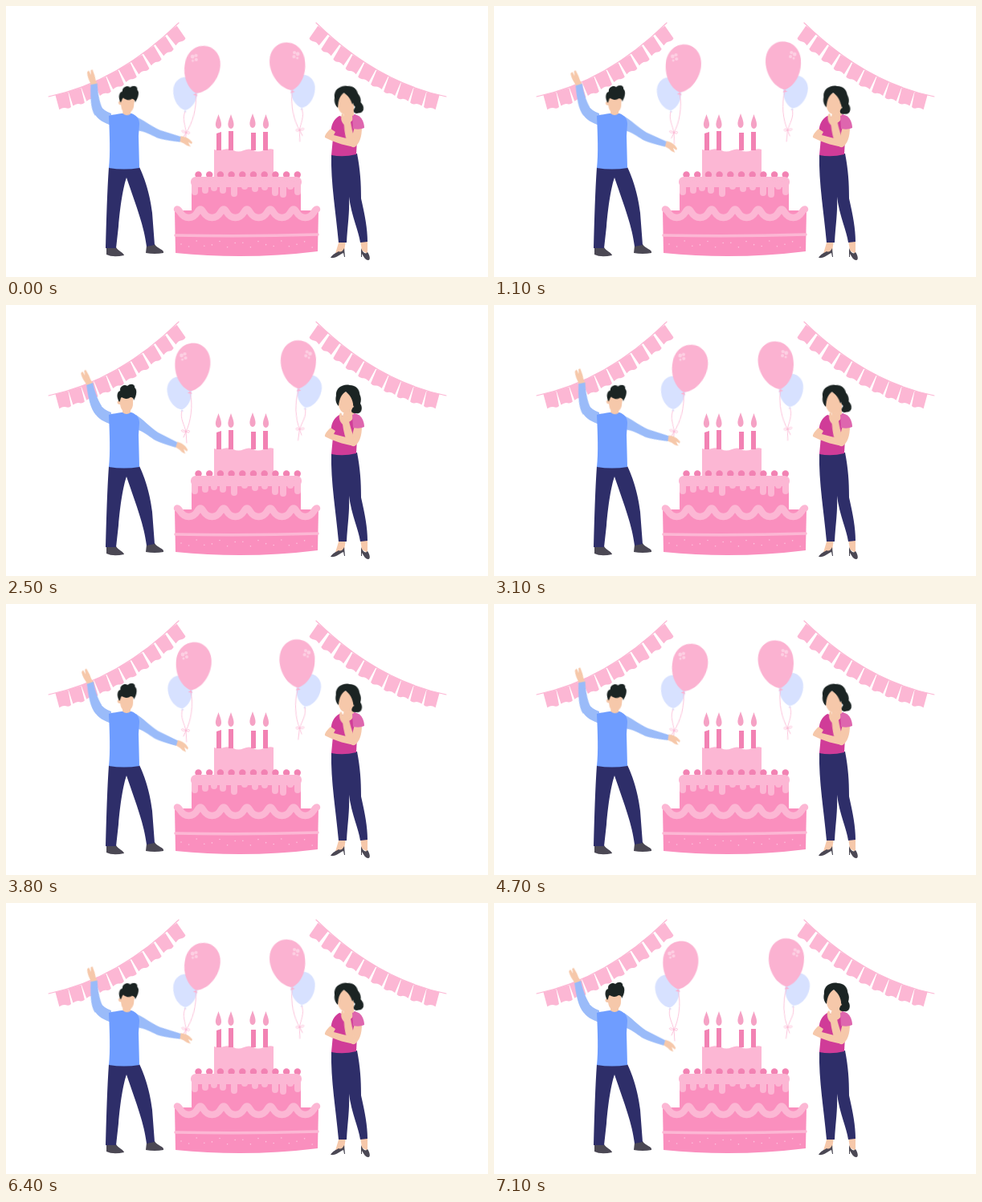
These frames come from a looping animation (600x338 px, 7200 ms). An HTML page:

```html
<!DOCTYPE html>
<html lang="en">
<head>
<meta charset="utf-8">
<title>Birthday cake</title>
<style>
  html, body { margin: 0; width: 100%; height: 100%; overflow: hidden; background: #fff; }
  svg { display: block; width: 100vw; height: 100vh; }

  .light { fill: #fcb7d4; }
  .mid { fill: #fa8fbe; }
  .deep { fill: #f282b3; }
  .skin { fill: #f6c8aa; }
  .navy { fill: #2e2e69; }
  .shoe { fill: #4b4854; }
  .hair { fill: #1b2423; }
  .sleeve { fill: #9abbf9; }
  .shirt { fill: #6f9dff; }
  .top { fill: #d03c98; }
  .cuff { fill: #de66ae; }
  .line { fill: none; stroke: #fcb7d4; stroke-linecap: round; stroke-linejoin: round; }

  /* Each part swings between two angles; the loop cuts back hard after nine half swings. */
  .swing {
    transform-origin: var(--at);
    animation: swing 7200ms cubic-bezier(.37, 0, .63, 1) infinite;
  }
  @keyframes swing {
    0%, 22.222%, 44.444%, 66.667%, 88.889% { transform: rotate(var(--from)); }
    11.111%, 33.333%, 55.556%, 77.778%, 100% { transform: rotate(var(--to)); }
  }
</style>
</head>
<body>
<svg viewBox="0 0 600 338" preserveAspectRatio="none">
  <defs>
    <path id="balloon" d="M0 30C-12 27-22 12-22-5C-22-20-12-30 0-30S22-20 22-5C22 12 12 27 0 30L3 33H-3Z"/>
    <path id="flame" d="M0-18C2-12 4-8 3.500-4C3-1 1 0 0 0S-3-1-3.500-4C-4-8-2-12 0-18Z"/>
    <g id="garland">
      <path class="line" d="M53 113Q140 95 215 21" stroke-width="1.2"/>
      <g id="flags" class="light"></g>
    </g>
    <g id="bunch">
      <use href="#balloon" transform="translate(216 110)rotate(-8)scale(.69)" fill="#d7e1ff"/>
      <path class="line" stroke-width=".8" d="M219 132C216 141 222 149 224 158M229 110C233 125 230 146 224 158"/>
      <path class="line" stroke-width=".8" d="M224 158C217 152 216 160 224 158C230 153 230 162 224 158L221 165M224 158L225 172"/>
      <use href="#balloon" transform="translate(231.500 77.500)rotate(5)" fill="#fbb2d1"/>
      <g fill="#fdd0e3">
        <circle cx="218" cy="63" r="2.400"/><circle cx="222" cy="61" r="2"/>
        <circle cx="223" cy="66" r="2"/><circle cx="219" cy="68" r="1.500"/>
      </g>
    </g>
  </defs>

  <use href="#garland"/>
  <use href="#garland" transform="translate(601)scale(-1 1)"/>

  <g class="swing" style="--at:224px 159px;--from:8.5deg;--to:0deg"><use href="#bunch"/></g>
  <g class="swing" style="--at:365px 155px;--from:-5deg;--to:4.6deg">
    <use href="#bunch" transform="translate(589.500 -3)scale(-1 1)"/>
  </g>

  <g id="cake">
    <path class="mid" d="M210 255H389L388 306Q300 317 211 308Z"/>
    <path class="line" d="M211 286Q300 288 388 285" stroke-width="3.500"/>
    <g id="specks" fill="#fdc3de"></g>
    <path class="mid" d="M231 216H367V256H231Z"/>
    <path id="scallops" class="line" stroke-width="8.500"/>
    <path class="light" d="M259 179Q265 181 271 179T283 180T296 180T308 180T321 180T333 179V215H259Z"/>
    <g id="berries" class="deep"></g>
    <rect class="light" x="230" y="213" width="138" height="13" rx="6"/>
    <path class="line" stroke-width="8" d="M235 221v11M248 221v9M259 221v6M270 221v9M284 221v13M297 221v4M310 221v7M322 221v5M335 221v12M345 221v14M354 221v4M363 221v11"/>
    <path class="deep" d="M262 159l6-2v23h-6zM277 156h6v24h-6zM305 158h6v22h-6zM320 157h6v23h-6z"/>
    <g fill="#f5a2c5">
      <use href="#flame" x="264.500" y="153"/><use href="#flame" x="280" y="153"/>
      <use href="#flame" x="307" y="152"/><use href="#flame" x="323.500" y="153"/>
    </g>
  </g>

  <g id="man">
    <path class="shoe" d="M125 301H137C140 306 147 308 147 311Q133 314 125 310ZM175 299L185 297C188 303 197 303 196 308Q185 310 174 308Z"/>
    <path class="navy" d="M128 201H166C171 211 179 232 182 258L185 298L175 300C172 275 163 252 150 214C146 225 142 250 140 275L137 302H124C125 265 126 230 128 201Z"/>
    <path class="sleeve" d="M117 124Q122 131 131 134V149C123 146 114 142 110 134Z"/>
    <g class="swing" style="--at:113px 130px;--from:10deg;--to:0deg">
      <path class="skin" d="M101 101C98 95 94 92 93 85L95 83L98 88L97 82L99 81L103 88L105 93L109 99Z"/>
      <path class="sleeve" d="M100 100L108 97C110 107 114 118 119 126L112 137C105 130 102 114 100 100Z"/>
    </g>
    <g class="swing" style="--at:166px 142px;--from:-10deg;--to:0deg">
      <path class="skin" d="M210 177L213 171C218 172 223 175 226 181L225 183L221 180L223 186L219 184L216 181Z"/>
      <path class="sleeve" d="M162 137C170 142 180 153 189 159L213 171.500L211 178C200 175 190 171 184 168C177 163 170 157 162 155Z"/>
    </g>
    <path class="shirt" d="M128 137C134 135 139 135 144 134H156C162 136 166 140 166 147L165 162L166 202Q147 205 128 202C130 185 129 160 128 137Z"/>
    <g class="swing" style="--at:148px 135px;--from:6deg;--to:0deg">
      <path class="skin" d="M145 126H155V134Q150 138 145 134Z"/>
      <path class="skin" d="M141 113H158V123C158 129 155 133 150 133S143 130 142 124C138 125 137 119 141 119Z"/>
      <path class="hair" d="M141 121C137 115 138 108 142 107C141 102 147 98 151 101C155 97 161 99 160 103C164 106 162 114 159 119C159 116 157 115 155 115C151 118 147 117 144 115C142 116 143 119 141 121Z"/>
    </g>
  </g>

  <g id="woman">
    <path class="skin" d="M415 292H423L421 306L409 312ZM441 292H450V309L443 305Z"/>
    <path class="shoe" d="M404 314C407 309 411 308 414 306Q418 308 421 302L422 313H421L420 308C415 310 411 315 404 314ZM442 302C444 308 448 310 450 307C453 311 454 317 451 317C447 317 445 312 443 309V313H442Z"/>
    <path class="navy" d="M405 185L437 184C441 205 442 220 442 240C447 262 450 278 450 294L441 295C439 280 430 262 427 238C428 257 425 275 424 295H414C411 260 404 220 405 185Z"/>
    <path class="top" d="M415 137Q427 142 434 135C442 138 442 152 437 166L436 185Q420 189 405 186L407 165C402 154 406 142 415 137Z"/>
    <path class="skin" d="M421 122H433V137C432 146 424 149 418 143L421 137Z"/>
    <g class="swing" style="--at:425px 136px;--from:-5deg;--to:0deg">
      <g class="swing" style="--at:435px 110px;--from:-9deg;--to:0deg">
        <path class="hair" d="M433 107C442 109 443 117 441 123C445 129 442 137 435 135C429 136 428 130 433 127C430 122 432 116 433 107Z"/>
      </g>
      <path class="skin" d="M413 114C414 109 420 107 425 109L432 116V126L429 134Q421 137 417 132C414 128 413 121 413 114Z"/>
      <path class="hair" d="M411 113C410 104 419 98 428 100C438 100 443 109 439 118L432 123C431 116 427 111 423 108C418 111 415 116 414 126C410 122 410 117 411 113Z"/>
    </g>
    <path class="skin" d="M404 153L410 157L408 161L431 167L434 176C420 174 404 168 397 164C396 161 401 156 404 153Z"/>
    <path class="skin" d="M434 150L443 151C443 163 440 172 434 176C429 177 427 172 430 167Z"/>
    <g class="swing" style="--at:431px 174px;--from:4deg;--to:0deg">
      <path class="skin" d="M425 173L434 174C434 165 429 155 427 145C427 139 424 137 422 134L420 135L419 139L417 134L415 136C414 142 416 146 419 149C420 157 422 165 425 173Z"/>
    </g>
    <path class="cuff" d="M431 137C439 133 446 142 446 152Q440 155 432 153Z"/>
  </g>
</svg>
<script>
  const add = (id, tag, attrs) => {
    const el = document.createElementNS('http://www.w3.org/2000/svg', tag);
    for (const key in attrs) el.setAttribute(key, attrs[key]);
    document.getElementById(id).append(el);
  };
  const quad = (a, b, c, t) => (1 - t) ** 2 * a + 2 * t * (1 - t) * b + t * t * c;

  for (let i = 0; i < 10; i++) {
    const t = 0.095 + 0.094 * i;
    const x = quad(53, 140, 215, t), y = quad(113, 95, 21, t);
    const slope = Math.atan2(-18 - 56 * t, 87 - 12 * t) * 180 / Math.PI;
    add('flags', 'path', {
      d: 'M-8.2 0H8.200L7.500 19Q4 21 1 19T-7.500 19Z',
      transform: `translate(${x} ${y})rotate(${slope * 0.85})`
    });
    add('berries', 'circle', { cx: 239.5 + 13.7 * i, cy: 210.5, r: 4.2 });
  }
  for (let i = 0; i < 18; i++) {
    add('specks', 'circle', { cx: 218 + 9.6 * i, cy: 297 + 4 * Math.sin(i * 2.3), r: 0.8 });
  }
  document.getElementById('scallops')
    .setAttribute('d', 'M213 253.500' + 'c4 0 4 10.500 14.500 10.500s10.500-10.500 14.500-10.500'.repeat(6));
</script>
</body>
</html>
```
